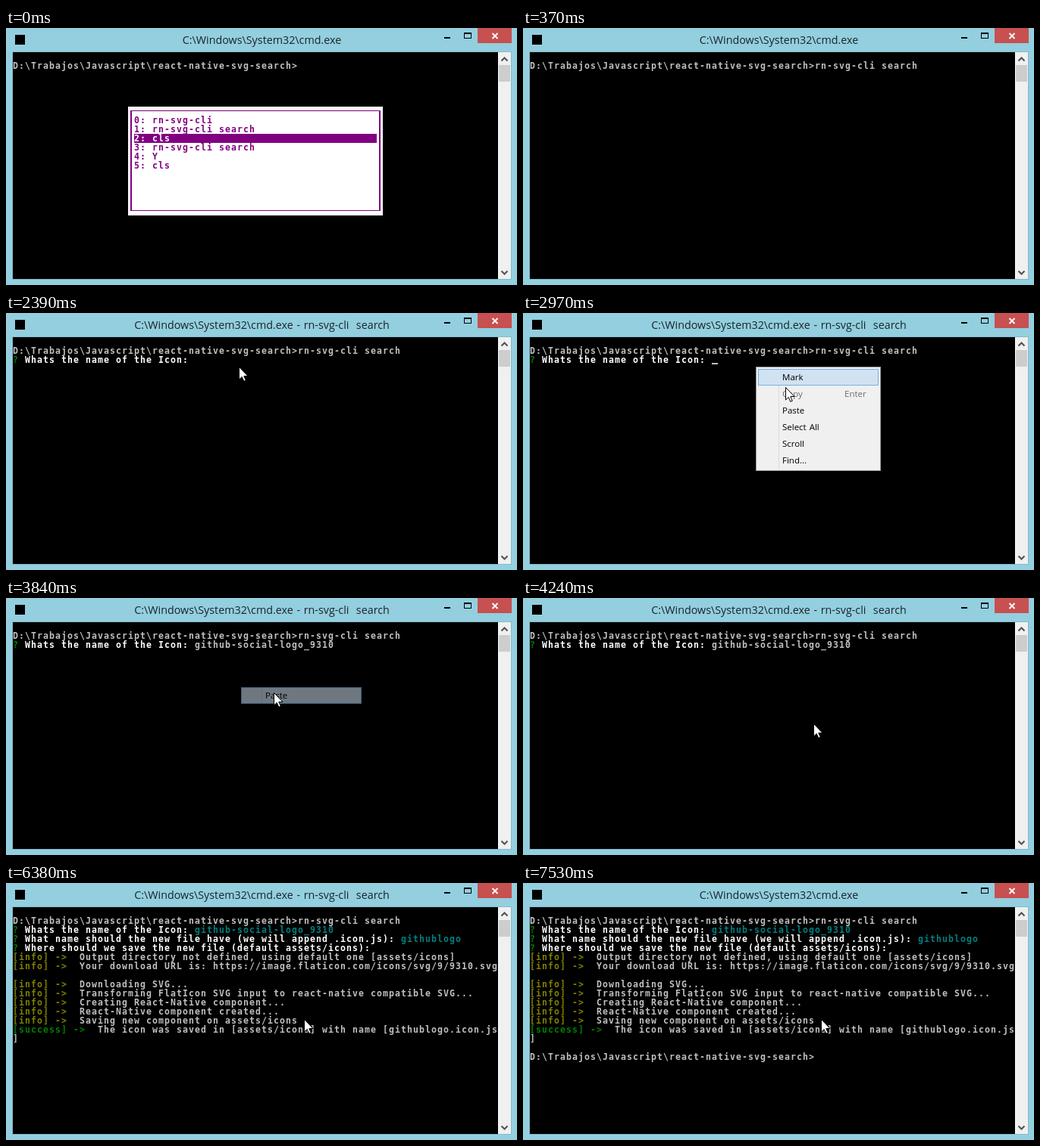
An HTML page with a canvas that plays this animation: 674x340 px, repeating every 7.63 s.

```html
<!DOCTYPE html>
<html lang="en">
<head>
<meta charset="utf-8">
<style>
  html, body { margin: 0; width: 100%; height: 100%; overflow: hidden; background: #93cfdf; }
  canvas { display: block; }
</style>
</head>
<body>
<canvas id="stage" width="674" height="340"></canvas>
<script>
const ctx = document.getElementById('stage').getContext('2d');
const LOOP = 7630;
const GRAY = '#c0c0c0', WHITE = '#fff', GREEN = '#008000', TEAL = '#008080', OLIVE = '#808000', PURPLE = '#800080';
const PROMPT = 'D:\\Trabajos\\Javascript\\react-native-svg-search>';
const COMMAND = 'rn-svg-cli search';
const ICON_NAME = 'github-social-logo_9310';
const FILE_NAME = 'githublogo';
const HISTORY = ['rn-svg-cli', COMMAND, 'cls', COMMAND, 'Y', 'cls'];
const MENU = ['Mark', 'Copy', 'Paste', 'Select All', 'Scroll', 'Find...'];

// Time at which each character of the file name is typed
const KEY_TIMES = [4950, 5010, 5080, 5140, 5200, 5270, 5430, 5500, 5570, 5640];

// Text caret: [on, off, column, row]
const CARETS = [
  [40, 200, 47, 1], [690, 1090, 30, 2], [2870, 3170, 30, 2], [6090, 6130, 60, 4],
  [6610, 6940, 47, 16], [7260, 7530, 47, 16]
];

// Mouse pointer: [time, x, y]
const POINTER_PATH = [
  [860, 646, 223], [1190, 348, 97], [1590, 322, 92], [2390, 307, 71], [2570, 307, 71],
  [2970, 346, 98], [3370, 353, 125], [3940, 353, 125], [4340, 393, 180]
];

// Console output: [time, row, message]
const LOG = [
  [6130, 5, 'Output directory not defined, using default one [assets/icons]'],
  [6130, 6, 'Your download URL is: https://image.flaticon.com/icons/svg/9/9310.svg'],
  [6130, 8, 'Downloading SVG...'],
  [6380, 9, 'Transforming FlatIcon SVG input to react-native compatible SVG...'],
  [6380, 10, 'Creating React-Native component...'],
  [6380, 11, 'React-Native component created...'],
  [6380, 12, 'Saving new component on assets/icons']
];

function rect(x, y, w, h, color) {
  ctx.fillStyle = color;
  ctx.fillRect(x, y, w, h);
}

function frame(x, y, w, h, color) {
  ctx.strokeStyle = color;
  ctx.lineWidth = 1;
  ctx.strokeRect(x + .5, y + .5, w - 1, h - 1);
}

function line(color, width, ...points) {
  ctx.strokeStyle = color;
  ctx.lineWidth = width;
  ctx.beginPath();
  points.forEach(([x, y]) => ctx.lineTo(x, y));
  ctx.stroke();
}

function label(text, x, y, size, color, align = 'left') {
  ctx.font = `${size}px "Open Sans", sans-serif`;
  ctx.letterSpacing = '0px';
  ctx.wordSpacing = '1px';
  ctx.textAlign = align;
  ctx.fillStyle = color;
  ctx.fillText(text, x, y);
}

// Console cells are 8 x 12 pixels
function write(col, row, text, color = GRAY) {
  ctx.font = 'bold 11.5px "DejaVu Sans Mono", monospace';
  ctx.letterSpacing = '1.077px';
  ctx.wordSpacing = '0px';
  ctx.textAlign = 'left';
  ctx.fillStyle = color;
  ctx.fillText(text, 9 + col * 8, 42 + row * 12);
}

function drawWindow(title) {
  rect(0, 0, 674, 340, '#93cfdf');
  rect(12, 9, 13, 13, '#000');
  label(title, 337.5, 21, 14.3, '#1a2428', 'center');
  rect(578, 12, 8, 2, '#000');
  frame(604, 6, 10, 8, '#000');
  rect(604, 6, 10, 2, '#000');
  rect(622, 0, 45, 20, '#c75050');
  line(WHITE, 2, [641.5, 7], [648.5, 14]);
  line(WHITE, 2, [648.5, 7], [641.5, 14]);

  frame(8, 31, 659, 302, '#84bac8');
  rect(9, 32, 640, 300, '#000');
  rect(649, 32, 17, 300, '#f0f0f0');
  rect(649, 32, 1, 300, WHITE);
  rect(650, 49, 15, 22, '#cdcdcd');
  line('#505050', 2, [653.5, 43.5], [657.5, 39.5], [661.5, 43.5]);
  line('#505050', 2, [653.5, 321.5], [657.5, 325.5], [661.5, 321.5]);
}

function drawHistory(selected) {
  rect(161, 104, 336, 144, WHITE);
  rect(164, 109, 330, 133, PURPLE);
  rect(166, 110, 326, 131, WHITE);
  rect(169, 116 + selected * 12, 320, 12, PURPLE);
  HISTORY.forEach((entry, i) => write(20, 7 + i, `${i}: ${entry}`, i === selected ? WHITE : PURPLE));
}

function drawQuestion(row, question, answer = '', color = GRAY) {
  write(0, row, '?', GREEN);
  write(2, row, question, WHITE);
  write(question.length + 3, row, answer, color);
}

function drawConsole(t) {
  write(0, 1, PROMPT);
  if (t >= 370) write(47, 1, COMMAND);
  if (t >= 690) {
    drawQuestion(2, 'Whats the name of the Icon:', t >= 3740 ? ICON_NAME : '', t >= 4820 ? TEAL : GRAY);
  }
  if (t >= 4880) {
    const typed = KEY_TIMES.filter(time => t >= time).length;
    drawQuestion(3, 'What name should the new file have (we will append .icon.js):',
      FILE_NAME.slice(0, typed), t >= 5700 ? TEAL : GRAY);
  }
  if (t >= 5770) drawQuestion(4, 'Where should we save the new file (default assets/icons):');
  for (const [time, row, message] of LOG) {
    if (t < time) continue;
    write(0, row, '[info] ->', OLIVE);
    write(11, row, message);
  }
  if (t >= 6380) {
    write(0, 13, '[success] ->', GREEN);
    write(14, 13, `The icon was saved in [assets/icons] with name [${FILE_NAME}.icon.js`);
    write(0, 14, ']');
  }
  if (t >= 6420) write(0, 16, PROMPT);
  for (const [on, off, col, row] of CARETS) {
    if (t >= on && t < off) rect(9 + col * 8, 42 + row * 12, 8, 2, GRAY);
  }
}

function drawMenuItem(i, hovered) {
  const y = 74 + i * 22, disabled = i === 1;
  if (hovered) {
    rect(310, y, 159, 22, disabled ? '#e6e6e6' : '#d1e2f2');
    frame(310, y, 159, 22, disabled ? '#aeaeae' : '#78aee5');
  }
  const color = disabled ? '#6d6d6d' : '#000';
  label(MENU[i], 342, y + 15, 11.5, color);
  if (disabled) label('Enter', 424, y + 15, 11.5, color);
}

function drawMenu(t) {
  if (t >= 2470 && t < 3740) {
    const hovered = t < 2570 ? -1 : t < 3070 ? 0 : t < 3270 ? 1 : 2;
    rect(307, 71, 165, 138, '#f0f0f0');
    frame(307, 71, 165, 138, '#979797');
    rect(337, 74, 1, 132, '#dcdcdc');
    MENU.forEach((_, i) => drawMenuItem(i, i === hovered));
  } else if (t >= 3740 && t < 4140) {
    // The chosen item darkens into the console in steps
    const fade = .25 + .22 * Math.floor((t - 3740) / 100);
    drawMenuItem(2, true);
    rect(337, 119, 1, 20, '#bccbd9');
    rect(310, 118, 159, 22, `rgba(0, 0, 0, ${fade})`);
  }
}

function pointerAt(t) {
  const origin = t < 2470 ? 890 : t < 3740 ? 2470 : 3740;
  const time = origin + Math.floor((t - origin) / 100) * 100;
  const next = POINTER_PATH.findIndex(p => p[0] > time);
  if (next < 0) return POINTER_PATH.at(-1).slice(1);
  const [t0, x0, y0] = POINTER_PATH[Math.max(0, next - 1)];
  const [t1, x1, y1] = POINTER_PATH[Math.max(1, next)];
  const k = Math.max(0, (time - t0) / (t1 - t0));
  return [Math.round(x0 + (x1 - x0) * k), Math.round(y0 + (y1 - y0) * k)];
}

function drawPointer(t) {
  if (t < 860) return;
  ctx.save();
  ctx.translate(...pointerAt(t));
  const arrow = new Path2D('M.5 .5V17L4.2 13.4L6.8 19.3L9.3 18.2L6.8 12.5H12Z');
  ctx.fillStyle = WHITE;
  ctx.fill(arrow);
  ctx.strokeStyle = '#000';
  ctx.lineWidth = 1;
  ctx.stroke(arrow);
  ctx.restore();
}

function render(now) {
  const t = now % LOOP;
  const running = t >= 450 && t < 6420;
  drawWindow('C:\\Windows\\System32\\cmd.exe' + (running ? ' - rn-svg-cli\u00a0 search' : ''));
  drawConsole(t);
  if (t < 370) drawHistory(t < 200 ? 2 : 1);
  drawMenu(t);
  drawPointer(t);
}

let start;
function tick(now) {
  start ??= now;
  render(now - start);
  requestAnimationFrame(tick);
}
requestAnimationFrame(tick);
</script>
</body>
</html>
```
